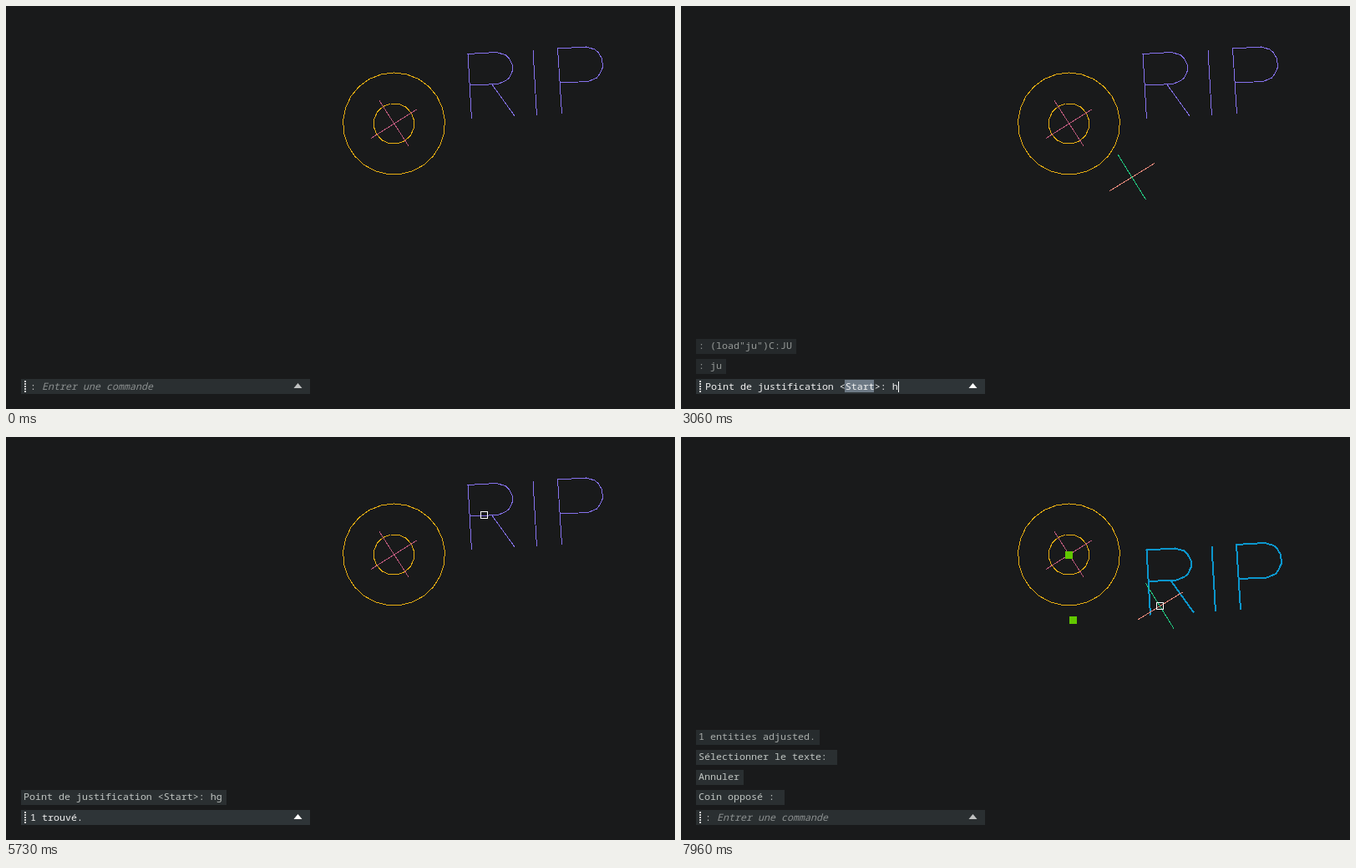
An HTML page for the animation above (7990 ms loop, 801 by 483 pixels).

```html
<!DOCTYPE html>
<html lang="fr">
<head>
<meta charset="utf-8">
<title>Justification de texte</title>
<style>
  html, body { margin: 0; width: 100%; height: 100%; overflow: hidden; background: #191a1b; }
  svg { display: block; width: 801px; height: 483px; }
  text { font: 11.667px "Noto Sans Mono", "DejaVu Sans Mono", monospace; white-space: pre; }
  .art { fill: none; stroke-width: 1; shape-rendering: crispEdges; }
  .box { fill: #2a2f31; shape-rendering: crispEdges; }
  .log text { fill: #c0c5c2; }
  .idle { fill: #8c9090; font-style: italic; }
</style>
</head>
<body>
<svg viewBox="0 0 801 483">
  <g class="art">
    <g stroke="#e8ae12"><path id="outer"/><path id="inner"/></g>
    <path stroke="#b9587a" d="M447 113.5L482.5 168.5M437 158.5L492.5 123.5"/>
    <path id="word" d="M557.5 135.5L553 57.5L587 55.5L598 58.5L602 62.5L606 69.5L606.5 77.5L602.5 86L598.5 89.5L589 93.5L555.5 95M581.5 93.5L609.5 132.5M631 53L635.5 131M665.5 129L660.5 51L694.5 49L705 52L709 55.5L713.5 63L714.5 73.5L711 81L707.5 86L697 90.5L663 92"/>
    <g id="grips" fill="#62c800"><path d="M460 137h9v9h-9zM465 215h9v9h-9z"/></g>
    <rect id="window" fill="#3f7a3f" fill-opacity=".6" stroke="#fff" stroke-dasharray="3 2"/>
    <g id="cross">
      <path stroke="#ee8a7c" d="M-26.5 16.5L27 -16.5"/>
      <path id="axis" stroke="#22c880" d="M-17 -27L16.5 27"/>
    </g>
    <rect id="pick" x="-4" y="-4" width="8" height="8" stroke="#fff"/>
  </g>
  <g id="arrow" fill="none" stroke="#fff">
    <circle cx=".5" cy=".5" r="9"/>
    <path fill="#fff" stroke="none" d="M-1 -1V13L2 10.5L5 16L7.5 15L5 9.5H9.5Z"/>
    <path d="M7.5 15.500H30.500V29.500H7.500Z"/>
    <circle cx="21.5" cy="15.500" r="4"/>
  </g>
  <g id="log" class="log"></g>
  <rect id="bar" x="18" y="447" width="346" height="18" shape-rendering="crispEdges"/>
  <path d="M23 449V464" stroke="#d0d0d0" stroke-width="2" stroke-dasharray="2 1" shape-rendering="crispEdges"/>
  <path id="tri" d="M344.500 458L349.500 452L354.500 458Z"/>
  <rect id="mark" x="196" y="448" width="35" height="15" fill="#6d7985"/>
  <text id="prompt" x="29" y="460" fill="#f2f2f2"></text>
  <text id="hint" x="43" y="460" class="idle">Entrer une commande</text>
  <path id="caret" stroke="#fff" shape-rendering="crispEdges"/>
  <g id="popup">
    <rect x="198.500" y="471.500" width="281" height="30" rx="4" fill="#18191a" stroke="#8e9090"/>
    <path d="M299 482.500H338" stroke="#1687d8" stroke-width="2"/>
  </g>
</svg>
<script>
const LOOP = 7990, CHAR = 7;
const $ = id => document.getElementById(id);
const NS = 'http://www.w3.org/2000/svg';

const ASK = 'Point de justification <Start>:';
const PICK = 'Sélectionner le texte: ';

// start time, prompt text (empty = idle)
const prompts = [
  [0, ''], [500, ': '], [650, ASK], [2990, ASK + ' h'], [3760, ASK + ' hg'],
  [4530, PICK], [5730, '1 trouvé.'], [5790, PICK], [6600, ''],
  [6860, 'Coin opposé : '], [7100, '']
];

// time pushed, text, time first drawn
const entries = [
  [500, ': (load"ju")C:JU'], [570, ': ju'], [4530, ASK + ' hg'],
  [5850, '1 entities adjusted.'], [6600, PICK, 6650], [6600, 'Annuler', 6650],
  [7100, 'Coin opposé : ']
];

// start, end, from, to, easing
const smooth = p => p * p * (3 - 2 * p);
const settle = p => 1 - (1 - p) ** 2.3;
const moves = [
  [1740, 2260, [441, 4], [540, 205], settle],
  [4900, 5440, [540, 205], [572.5, 93.5], smooth],
  [6410, 6600, [572.5, 93.5], [590.5, 144.5], smooth],
  [6860, 7050, [590.5, 144.5], [576, 111], smooth],
  [7270, 7560, [576, 111], [573.5, 202.5], smooth]
];

function polygon(n, r, start) {
  const pts = Array.from({ length: n }, (_, i) => {
    const a = (start + i * 360 / n) * Math.PI / 180;
    return (464.5 + r * Math.cos(a)).toFixed(1) + ' ' + (141 + r * Math.sin(a)).toFixed(1);
  });
  return 'M' + pts.join('L') + 'Z';
}
$('outer').setAttribute('d', polygon(25, 61, -90));
$('inner').setAttribute('d', polygon(16, 24.4, -100));

const set = (id, attrs) => {
  for (const k in attrs) $(id).setAttribute(k, attrs[k]);
};
const show = (id, on) => { $(id).style.display = on ? '' : 'none'; };
const within = (t, a, b) => t >= a && t < b;

const rows = entries.map(([, text]) => {
  const g = document.createElementNS(NS, 'g');
  const box = document.createElementNS(NS, 'rect');
  const label = document.createElementNS(NS, 'text');
  box.setAttribute('class', 'box');
  box.setAttribute('x', 18);
  box.setAttribute('width', text.length * CHAR + 8);
  box.setAttribute('height', 18);
  label.setAttribute('x', 21);
  label.setAttribute('y', 12);
  label.textContent = text;
  g.append(box, label);
  $('log').append(g);
  return g;
});

function cursorAt(t) {
  let pos = moves[0][2];
  for (const [a, b, from, to, ease] of moves) {
    if (t < a) break;
    const e = ease(Math.min(1, (t - a) / (b - a)));
    pos = from.map((v, i) => v + (to[i] - v) * e);
  }
  return pos;
}

// lines fade in steps about two seconds after they were pushed
function fade(age) {
  return age < 2100 ? 1 : Math.max(0, 1 - 0.13 * (1 + Math.floor((age - 2100) / 250)));
}

function drawLog(t) {
  const count = entries.filter(e => e[0] <= t).length;
  entries.forEach(([born, , drawn = born], i) => {
    const back = count - 1 - i;
    const on = t >= drawn && back >= 0 && back < 4;
    rows[i].style.display = on ? '' : 'none';
    rows[i].setAttribute('transform', `translate(0 ${423 - 24 * back})`);
    rows[i].setAttribute('opacity', fade(t - born));
  });
}

function drawPrompt(t) {
  const text = prompts.filter(p => p[0] <= t).pop()[1];
  const idle = !text;
  $('prompt').textContent = text || ':';
  set('prompt', { fill: idle ? '#c8c8c8' : '#f2f2f2' });
  set('bar', { fill: idle ? '#2a2f31' : '#2e3437' });
  set('tri', { fill: idle ? '#c0c2c2' : '#fff' });
  show('hint', idle);
  show('mark', text.startsWith(ASK));
  show('caret', within(t, 2990, 3510) || within(t, 3760, 4270));
  set('caret', { d: `M${29.5 + text.length * CHAR} 450V463` });
}

function drawScene(t) {
  const [x, y] = cursorAt(t);
  const moved = t >= 5790, selected = t >= 7100;
  const dragging = within(t, 6860, 7100);
  const hover = within(t, 5340, 5730);
  const at = `translate(${x} ${y})`;

  set('word', {
    transform: moved ? 'translate(4.500 78)' : '',
    stroke: selected ? '#0c96cc' : '#8672ee',
    'stroke-width': selected || hover ? 2 : 1
  });
  show('grips', selected);

  show('cross', within(t, 1740, 4530) || (t >= 6600 && !dragging));
  show('axis', !within(t, 2095, 2130));
  set('cross', { transform: at });

  show('pick', t >= 4530 && !dragging);
  set('pick', { transform: `translate(${Math.floor(x) + .5} ${Math.floor(y) + .5})` });

  show('window', dragging);
  set('window', {
    x: Math.round(x) - .5, y: Math.round(y) - .5,
    width: Math.max(0, 591 - Math.round(x)), height: Math.max(0, 146 - Math.round(y))
  });
  show('arrow', dragging);
  set('arrow', { transform: at });
  show('popup', within(t, 6960, 7100));
}

const begin = performance.now();
function frame() {
  const t = (performance.now() - begin) % LOOP;
  drawLog(t);
  drawPrompt(t);
  drawScene(t);
  requestAnimationFrame(frame);
}
frame();
</script>
</body>
</html>
```
